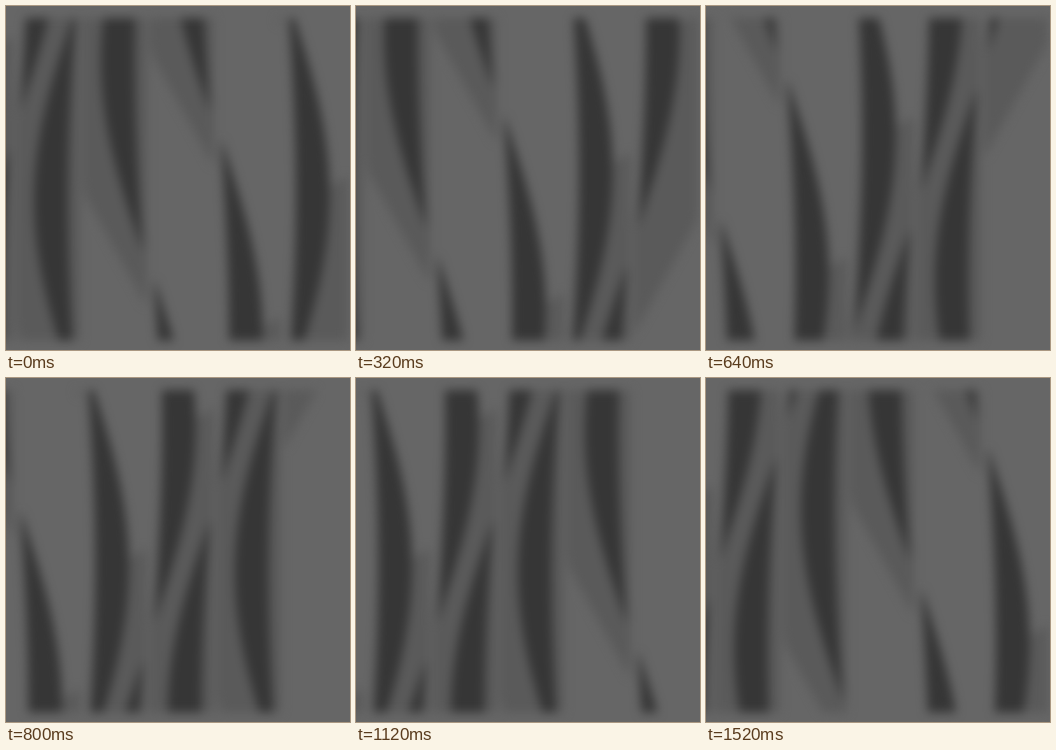
An HTML page that plays this animation: 540x540 px, repeating every 1.6 s.

```html
<!DOCTYPE html>
<html>
<head>
<meta charset="utf-8">
<style>
html, body { margin: 0; width: 100%; height: 100%; overflow: hidden; background: #666; }
svg { display: block; width: 100vw; height: 100vh; }
</style>
</head>
<body>
<svg viewBox="0 0 540 540">
  <defs>
    <filter id="soft" filterUnits="userSpaceOnUse" x="-60" y="-60" width="660" height="660" color-interpolation-filters="sRGB">
      <feGaussianBlur stdDeviation="8"/>
    </filter>
    <clipPath id="window"><rect x="-60" y="19" width="660" height="506"/></clipPath>
  </defs>
  <rect width="540" height="540" fill="#666"/>
  <g filter="url(#soft)"><g id="stage" clip-path="url(#window)"></g></g>
</svg>
<script>
const NS = 'http://www.w3.org/2000/svg';
const LOOP = 1600, STEP = 80;
const PERIOD = 1320, LAG = 220, PITCH = 105, COLS = 5;
const MID = '#5a5a5a', DARK = '#363636';
const stage = document.getElementById('stage');

// Pairs of step and travel, in 24ths of a period
const PACE = [[0, 0], [2, 2], [5, 6], [8, 9.7], [10, 12], [14, 16], [19, 21.8], [20, 24]];

const clamp = v => Math.max(0, Math.min(1, v));
const bump = (u, a, b) => Math.sin(Math.PI * clamp((u - a) / (b - a)));

// Outer and inner edge of the two dark faces, relative to the column centre
const faceA = u => { const b = bump(u, -15, 603); return [-44 + 13 * b, -44 + 66 * b]; };
const faceB = u => { const b = bump(u, 440, 1045); return [44 - 66 * b, 44 - 13 * b]; };

function side(last) {
  return u => {
    const left = u < 603 ? faceA(u)[1] - 8 : -50 + 100 * clamp((u - 950) / 180);
    const enter = 50 * clamp((u - 265) / 60);
    const right = last ? 50 - 100 * clamp((u - 590) / 180) : 50;
    return [Math.min(Math.max(left, 50 - 2 * enter), right), right];
  };
}

function strip(edges, from, to) {
  const a = [], b = [];
  for (let i = 0; i <= 40; i++) {
    const u = from + (to - from) * i / 40;
    const [l, r] = edges(u);
    a.push(l.toFixed(1) + ' ' + u.toFixed(1));
    b.unshift(r.toFixed(1) + ' ' + u.toFixed(1));
  }
  return 'M' + a.concat(b).join('L') + 'Z';
}

function add(parent, tag, attrs) {
  const el = document.createElementNS(NS, tag);
  for (const name in attrs) el.setAttribute(name, attrs[name]);
  return parent.appendChild(el);
}

const columns = [];
for (let k = 0; k <= COLS; k++) {
  const last = k === COLS;
  for (const wrap of [0, PERIOD]) {
    const g = add(stage, 'g', {});
    add(g, 'path', { d: strip(side(last), 265, last ? 770 : 1130), fill: MID });
    add(g, 'path', { d: strip(faceA, -15, 603), fill: DARK });
    if (!last) add(g, 'path', { d: strip(faceB, 440, 1045), fill: DARK });
    columns.push({ g, k, wrap });
  }
}

function travel(step) {
  const i = PACE.findIndex(p => p[0] > step);
  const [s0, n0] = PACE[i - 1], [s1, n1] = PACE[i];
  return (n0 + (n1 - n0) * (step - s0) / (s1 - s0)) * PERIOD / 24;
}

function draw(ms) {
  const shift = travel(Math.floor((ms % LOOP) / STEP));
  for (const { g, k, wrap } of columns) {
    const top = (2 + LAG * (COLS - k) - shift + 2 * PERIOD) % PERIOD - wrap;
    g.setAttribute('transform', `translate(${66 + PITCH * (k - 1)} ${top.toFixed(2)})`);
  }
}

let start = null;
function tick(now) {
  if (start === null) start = now;
  draw(now - start);
  requestAnimationFrame(tick);
}
draw(0);
requestAnimationFrame(tick);
</script>
</body>
</html>
```
